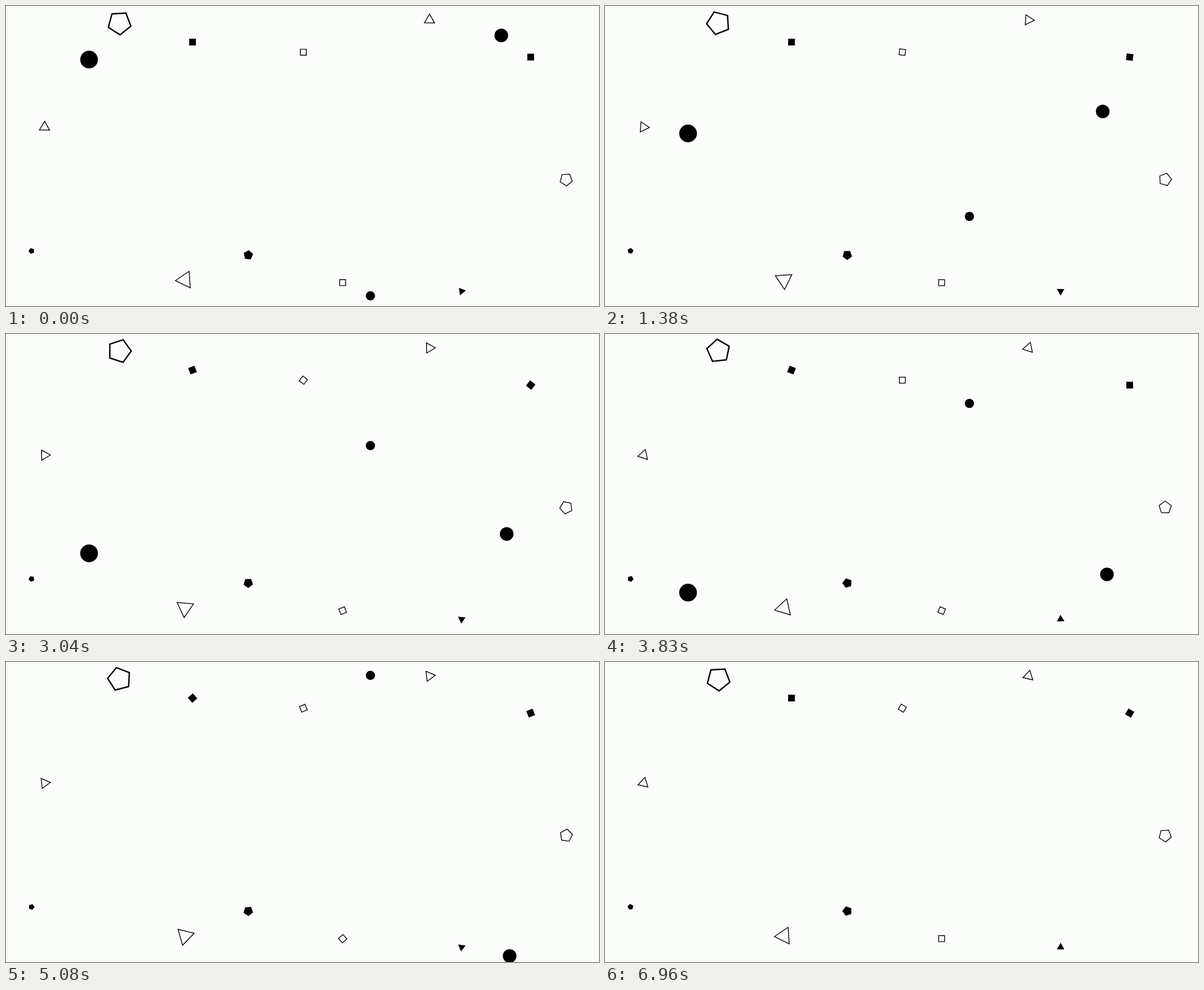
These frames come from a looping animation (1053 px wide and 532 px high, 7 s). An HTML page with a canvas:

```html
<!DOCTYPE html>
<html lang="en">
<head>
<meta charset="utf-8">
<title>Drifting shapes</title>
<style>
html, body { margin: 0; width: 100%; height: 100%; overflow: hidden; background: #fbfdfb; }
canvas { display: block; }
</style>
</head>
<body>
<canvas id="stage" width="1053" height="532"></canvas>
<script>
const canvas = document.getElementById('stage');
const ctx = canvas.getContext('2d');
const LOOP = 7000, FPS = 24, FRAMES = LOOP * FPS / 1000;
const THIN = 1.4, THICK = 2.5, SIDE = 12;

const bezier = (u, a, b) => 3 * (1 - u) * (1 - u) * u * a + 3 * (1 - u) * u * u * b + u * u * u;
const mix = (a, b, t) => a + (b - a) * t;

// Linear start, soft landing: cubic-bezier(1/6, 1/6, 2/3, 1)
function ease(x) {
  let lo = 0, hi = 1;
  for (let i = 0; i < 30; i++) {
    const mid = (lo + hi) / 2;
    if (bezier(mid, 1 / 6, 2 / 3) < x) lo = mid; else hi = mid;
  }
  return bezier(lo, 1 / 6, 1);
}

// Regular polygon with one corner at the given angle; filled when line is 0
function polygon(sides, x, y, radius, degrees, line = 0) {
  ctx.beginPath();
  for (let i = 0; i < sides; i++) {
    const a = (degrees + i * 360 / sides) * Math.PI / 180;
    ctx.lineTo(x + radius * Math.cos(a), y + radius * Math.sin(a));
  }
  ctx.closePath();
  ctx.lineWidth = line;
  if (line) ctx.stroke(); else ctx.fill();
}

const triangle = (...args) => polygon(3, ...args);
const pentagon = (...args) => polygon(5, ...args);

// Outlined and filled squares share the same outer side
function square(x, y, degrees, line = 0) {
  polygon(4, x, y, (SIDE - line) / Math.SQRT2, 45 + degrees, line);
}

function circle(x, y, radius) {
  ctx.beginPath();
  ctx.arc(x, y, radius, 0, Math.PI * 2);
  ctx.fill();
}

function scene(e) {
  const turn = 360 * e;
  const wide = 372 * e;
  const wider = 390 * e;

  square(331.2, 64, -turn);
  square(597.8, 490.6, -turn, THIN);
  square(931.7, 90.6, wider);
  square(528, 81.9, wider, THIN);

  triangle(752, 24.7, 10.4, wide - 89, THIN);
  triangle(68.5, 214.7, 10.4, wide - 89, THIN);
  triangle(317.7, 485.8, 17, 176 - turn, THIN);
  triangle(809, 505.7, 7.7, 400 * e - 9);

  pentagon(201.4, 30.2, 21, 87 + turn, THICK);
  pentagon(994.7, 307.7, 11.4, 87 - turn, THIN);
  pentagon(45.3, 434.3, 5.4, 181 + wide);
  pentagon(430.2, 441.7, 8.8, 697 * e - 84);

  circle(147.5, mix(95, 621, e), 15.7);
  circle(mix(879.5, 896.6, e), mix(52.2, 593.4, e), 12.1);
  circle(647.1, mix(514, -51.6, e), 8.2);
}

function render(ms) {
  const frame = Math.floor((ms % LOOP + 4) * FPS / 1000) % FRAMES;
  ctx.clearRect(0, 0, canvas.width, canvas.height);
  scene(ease(frame / FRAMES));
}

const began = performance.now();
function tick() {
  render(performance.now() - began);
  requestAnimationFrame(tick);
}
tick();
</script>
</body>
</html>
```
